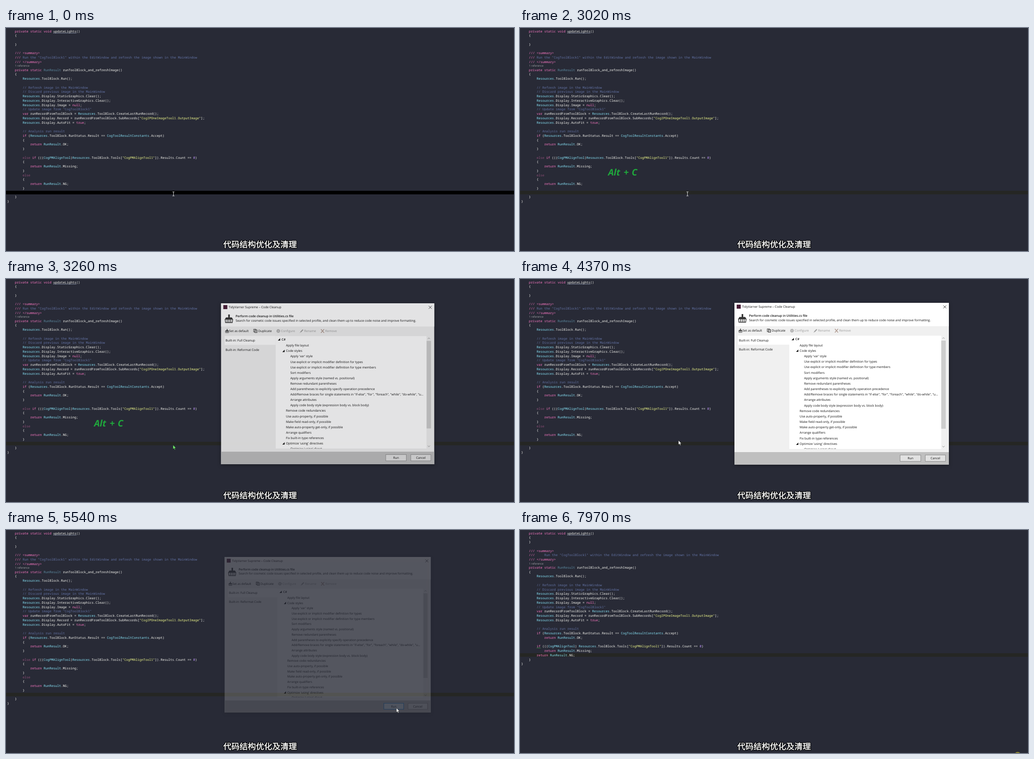
An HTML page with a canvas for the animation above (8.11 s loop, 1130 by 496 pixels).

```html
<!DOCTYPE html>
<html lang="en">
<head>
<meta charset="utf-8">
<title>Code cleanup</title>
<style>
  html, body { margin: 0; width: 100%; height: 100%; overflow: hidden; background: #282a36; }
  canvas { display: block; }
</style>
</head>
<body>
<canvas id="stage" width="1130" height="496"></canvas>
<script>
const stage = document.getElementById('stage').getContext('2d');
const layerCanvas = Object.assign(document.createElement('canvas'), { width: 1130, height: 496 });
const layer = layerCanvas.getContext('2d');
stage.textRendering = layer.textRendering = 'geometricPrecision';
let ctx = stage;

const LOOP = 8110;
const MONO = '"Noto Sans Mono", monospace';
const SANS = '"Open Sans", sans-serif';
const COLUMN = 4.265, ROW = 9.75, LENS = 8;

const colors = {
  keyword: '#ff79c6', comment: '#6272a4', string: '#f1fa8c', type: '#8be9fd',
  dimType: '#5f8fa6', dimKeyword: '#904d78', number: '#bd93f9', plain: '#f8f8f2'
};
const syntax = new RegExp([
  /(?<keyword>\/\/\/( <.*)?|\b(private|static|void|var|if|return|null|true)\b)/,
  /(?<comment>\/\/.*|(?<=\/\/\/).+)/,
  /(?<string>"[^"]*")/,
  /(?<dimType>(?<=static )RunResult)/,
  /(?<dimKeyword>\belse\b)/,
  /(?<type>Resources|RunResult|Cog\w+)/,
  /(?<number>\b0\b)/,
  /(?<plain>\w+|[^\w\s"/]+)/
].map(r => r.source).join('|'), 'g');

const body = `    /// </summary>
    private static RunResult runToolBlock_and_refreshImage()
    {
        Resources.ToolBlock.Run();

        // Refresh image in the MainWindow
        // Discard previous image in the MainWindow
        Resources.Display.StaticGraphics.Clear();
        Resources.Display.InteractiveGraphics.Clear();
        Resources.Display.Image = null;
        // Update image from "CogToolBlock1"
        var runRecordFromToolBlock = Resources.ToolBlock.CreateLastRunRecord();
        Resources.Display.Record = runRecordFromToolBlock.SubRecords["CogIPOneImageTool1.OutputImage"];
        Resources.Display.AutoFit = true;

        // Analysis run result
        if (Resources.ToolBlock.RunStatus.Result == CogToolResultConstants.Accept)`;
const summary = 'Run the "CogToolBlock1" within the EditWindow and refresh the image shown in the MainWindow';

const messyCode = `    private static void updateLights()
    {

    }

    /// <summary>
    /// ${summary}
${body}
        {
            return RunResult.OK;
        }

        else if (((CogPMAlignTool)Resources.ToolBlock.Tools["CogPMAlignTool1"]).Results.Count == 0)
        {
            return RunResult.Missing;
        }
        else
        {
            return RunResult.NG;
        }

    }
}`.split('\n');

const cleanCode = `    private static void updateLights()
    {
    }

    /// <summary>
    ///     ${summary}
${body}
            return RunResult.OK;

        if (((CogPMAlignTool) Resources.ToolBlock.Tools["CogPMAlignTool1"]).Results.Count == 0)
            return RunResult.Missing;
        return RunResult.NG;
    }
}`.split('\n');

// y is the middle of the capital letters
function text(str, x, y, { size = 6.92, family = SANS, weight = 400, color = '#111', align = 'left' } = {}) {
  ctx.font = `${weight} ${size}px ${family}`;
  ctx.fillStyle = color;
  ctx.textAlign = align;
  ctx.fillText(str, x, y + size * 0.355);
}

function rect(x, y, w, h, fill, border) {
  ctx.fillStyle = fill;
  ctx.fillRect(x, y, w, h);
  if (border) {
    ctx.strokeStyle = border;
    ctx.lineWidth = 1;
    ctx.strokeRect(x + 0.5, y + 0.5, w - 1, h - 1);
  }
}

function lines(color, width, ...paths) {
  ctx.strokeStyle = color;
  ctx.lineWidth = width;
  ctx.beginPath();
  for (const [x, y, ...rest] of paths) {
    ctx.moveTo(x, y);
    for (let i = 0; i < rest.length; i += 2) ctx.lineTo(rest[i], rest[i + 1]);
  }
  ctx.stroke();
}

function polygon(points, fill) {
  ctx.fillStyle = fill;
  ctx.beginPath();
  points.forEach(([x, y]) => ctx.lineTo(x, y));
  ctx.closePath();
  ctx.fill();
}

function dashed(x1, x2, y, color) {
  ctx.setLineDash([2, 1]);
  lines(color, 1, [x1, y, x2, y]);
  ctx.setLineDash([]);
}

function drawCode(code) {
  const lensRow = code.findIndex(line => line.includes('_and_'));
  code.forEach((line, row) => {
    const y = 7 + row * ROW + (row >= lensRow ? LENS : 0);
    for (const match of line.matchAll(syntax)) {
      const kind = Object.keys(match.groups).find(k => match.groups[k] !== undefined);
      text(match[0], 2.8 + match.index * COLUMN, y, { size: 7.11, family: MONO, weight: 500, color: colors[kind] });
    }
  });
  text('1 reference', 20, lensRow * ROW + 6.2, { size: 6.1, color: '#a3a4a8' });
  dashed(105.5, 157, 11.5, '#a9b4cc');
}

function broom(x, y, s) {
  ctx.save();
  ctx.translate(x, y);
  ctx.scale(s, s);
  rect(8, 0, 3.5, 7, '#333');
  polygon([[3, 6.5], [16, 6.5], [19, 11.5], [0, 11.5]], '#333');
  lines('#333', 1.5, [1, 11, 2, 18.3, 17, 18.3, 18, 11], [5.5, 11, 5.5, 18], [9.5, 11, 9.5, 18], [13.5, 11, 13.5, 18]);
  ctx.restore();
}

function drawToolbar() {
  const gray = { color: '#9b9b9b' };
  broom(486, 110.5, 0.46);
  text('Set as default', 495, 115);
  rect(549.5, 110.5, 6, 7, '#eee', '#333');
  rect(552, 112, 6, 7, '#eee', '#333');
  lines('#333', 0.7, [553.5, 114.5, 556.5, 114.5], [553.5, 116.5, 556.5, 116.5]);
  text('Duplicate', 560, 115);
  ctx.strokeStyle = '#a0a0a0';
  for (const [radius, width, dash] of [[3.6, 1.3, [1.6, 1.2]], [2.4, 1.2, []], [0.7, 0.8, []]]) {
    ctx.lineWidth = width;
    ctx.setLineDash(dash);
    ctx.beginPath();
    ctx.arc(605, 115, radius, 0, 7);
    ctx.stroke();
  }
  ctx.setLineDash([]);
  text('Configure', 611, 115, gray);
  lines('#a0a0a0', 2.4, [655, 117.3, 660.3, 112]);
  lines('#a0a0a0', 1, [653.2, 119, 655, 117.3]);
  text('Rename', 663, 115, gray);
  lines('#b09a90', 1.6, [700.5, 111, 707.5, 119], [707.5, 111, 700.5, 119]);
  text('Remove', 710, 115, gray);
}

const tree = [
  [1, 'Apply file layout'], [1, 'Code styles', true], [2, "Apply 'var' style"],
  [2, 'Use explicit or implicit modifier definition for types'],
  [2, 'Use explicit or implicit modifier definition for type members'],
  [2, 'Sort modifiers'], [2, 'Apply arguments style (named vs. positional)'],
  [2, 'Remove redundant parentheses'],
  [2, 'Add parentheses to explicitly specify operation precedence'],
  [2, 'Add/Remove braces for single statements in "if-else", "for", "foreach", "while", "do-while", "u...'],
  [2, 'Arrange attributes'], [2, 'Apply code body style (expression body vs. block body)'],
  [1, 'Remove code redundancies'], [1, 'Use auto-property, if possible'],
  [1, 'Make field read-only, if possible'], [1, 'Make auto-property get-only, if possible'],
  [1, 'Arrange qualifiers'], [1, 'Fix built-in type references'],
  [1, "Optimize 'using' directives", true], [2, "Optimize 'using' direct"]
];

function expander(x, y) {
  polygon([[x, y + 2.6], [x + 5.2, y + 2.6], [x + 5.2, y - 2.6]], '#111');
}

function drawTree() {
  ctx.save();
  ctx.beginPath();
  ctx.rect(599, 126, 348, 252);
  ctx.clip();
  rect(599, 126, 338, 252, '#fff');
  rect(937, 126, 10, 252, '#f0f0f0');
  rect(937, 137, 10, 196, '#cdcdcd');
  lines('#777', 0.8, [939.5, 132.8, 942, 130.3, 944.5, 132.8], [939.5, 371.5, 942, 374, 944.5, 371.5]);
  expander(604, 133.7);
  text('C#', 612.5, 133.7, { weight: 600 });
  tree.forEach(([depth, label, open], i) => {
    const y = 147.3 + i * 12.17;
    if (open) expander(614, y);
    text(label, 612.3 + depth * 9.8, y);
  });
  ctx.restore();
}

// buttonState: 0 idle, 1 hover, 2 pressed
function drawWindow(buttonState) {
  rect(477, 53, 477, 360, '#f0f0f0');
  rect(477, 53, 477, 52, '#fff');
  rect(482, 57, 9, 9, '#4a1f38');
  text('TidyVarner Supreme – Code Cleanup', 494, 62);
  lines('#222', 0.9, [941.7, 58.7, 948.3, 65.3], [948.3, 58.7, 941.7, 65.3]);
  broom(485, 78, 1);
  text('Perform code cleanup in Utilities.cs file', 509.5, 81.7, { weight: 600 });
  text('Search for cosmetic code issues specified in selected profile, and clean them up to reduce code noise and improve formatting.', 509.5, 91.3);
  drawToolbar();
  rect(485, 126, 114, 20, '#fff');
  text('Built-in: Full Cleanup', 487, 136.3);
  text('Built-in: Reformat Code', 487, 157);
  drawTree();
  rect(477, 385, 477, 28, '#bfbfbf');
  const [fill, border] = [['#e1e1e1', '#8c8c8c'], ['#e5f1fb', '#0078d7'], ['#cce4f7', '#005499']][buttonState];
  rect(845, 391, 47, 15, fill, border);
  rect(901, 391, 46, 15, '#e1e1e1', '#8c8c8c');
  text('Run', 868.5, 398.7, { align: 'center' });
  text('Cancel', 924, 398.7, { align: 'center' });
}

// shown runs from 0 (closed) to 1 (open); the window fades and grows as one layer
function drawDialog(shown, buttonState) {
  const scale = 0.95 + 0.05 * shown;
  ctx = layer;
  ctx.clearRect(0, 0, 1130, 496);
  ctx.save();
  ctx.translate(715.5, 233);
  ctx.scale(scale, scale);
  ctx.translate(-715.5, -233);
  drawWindow(buttonState);
  ctx.restore();
  ctx = stage;
  ctx.save();
  ctx.globalAlpha = shown;
  ctx.shadowColor = 'rgba(0, 0, 0, 0.35)';
  ctx.shadowBlur = 8;
  ctx.shadowOffsetY = 2;
  ctx.drawImage(layerCanvas, 0, 0);
  ctx.restore();
}

function drawArrow(x, y, fill) {
  const shape = [[0, 0], [0, 9.6], [2.2, 7.6], [3.7, 10.9], [5.2, 10.2], [3.7, 7], [6.6, 7]];
  const points = shape.map(([dx, dy]) => [x + dx, y + dy]);
  polygon(points, fill);
  lines('#111', 0.5, [...points, points[0]].flat());
}

function drawBeam(x, y) {
  lines('#d8d8d8', 1, [x, y - 4.5, x, y + 4.5],
    [x - 2.2, y - 4.5, x + 2.2, y - 4.5], [x - 2.2, y + 4.5, x + 2.2, y + 4.5]);
}

// keys: [time, x, y]
function along(keys, t) {
  const i = keys.findIndex(key => t < key[0]);
  if (i === 0) return keys[0].slice(1);
  if (i < 0) return keys.at(-1).slice(1);
  const [t0, x0, y0] = keys[i - 1], [t1, x1, y1] = keys[i];
  const p = (t - t0) / (t1 - t0), e = p * p * (3 - 2 * p);
  return [x0 + (x1 - x0) * e, y0 + (y1 - y0) * e];
}

// value of the last step already reached
const stepAt = (steps, t) => steps.reduce((value, [time, next]) => t >= time ? next : value, 0);

const dialogSteps = [[3100, 0.25], [3190, 0.62], [3260, 0.88], [3370, 1], [5440, 0.65], [5540, 0.22], [5610, 0]];
const buttonSteps = [[5210, 1], [5290, 2], [5440, 1]];
const caretSteps = [[150, 1], [700, 0], [1230, 1], [1780, 0], [2330, 1], [2790, 0], [6080, 1], [6540, 0], [7070, 1], [7970, 0]];
const arrowPath = [[4370, 352.5, 359], [4870, 979, 437], [5140, 868.5, 396]];
const beamPath = [[6770, 870, 396], [7240, 1038, 506]];

function drawPointer(t) {
  if (t < 3190) drawBeam(372.5, 369);
  else if (t < 4370) drawArrow(371.5, 369, t < 3370 ? '#6fe86a' : '#fff');
  else if (t < 6080) drawArrow(...along(arrowPath, t), '#fff');
  else drawBeam(...along(beamPath, t));
}

function drawSubtitle() {
  const label = '代码结构优化及清理';
  ctx.font = '18.2px "Noto Sans CJK SC", "Noto Sans CJK", sans-serif';
  ctx.textAlign = 'center';
  ctx.lineJoin = 'round';
  for (const [color, width] of [['#000', 3], ['#fff', 0.5]]) {
    ctx.strokeStyle = color;
    ctx.lineWidth = width;
    ctx.strokeText(label, 565, 487.6);
  }
  ctx.fillStyle = '#fff';
  ctx.fillText(label, 565, 487.6);
  ctx.lineJoin = 'miter';
}

function draw(t) {
  const clean = t >= 6080;
  const focused = t < 3020 || (clean && t < 7970);
  rect(0, 0, 1130, 496, '#282a36');
  rect(0, clean ? 274 : 362, 1130, 8, focused ? '#000' : '#252624');
  drawCode(clean ? cleanCode : messyCode);
  if (t >= 6380) dashed(37.5, 46, 262.5, '#3fae4a');
  if (stepAt(caretSteps, t)) rect(clean ? 122 : 33, clean ? 273 : 361, 1, 9, '#e8e8e8');

  if (t >= 3020 && t < 3370) {
    const style = { size: 20, family: '"Noto Sans", sans-serif', weight: 'italic 600', color: '#1fa83c' };
    text('Alt', 196, 321, style);
    text('+', 230.5, 321, style);
    text('C', 248.5, 321, style);
  }
  const shown = stepAt(dialogSteps, t);
  if (shown) drawDialog(shown, stepAt(buttonSteps, t));
  drawSubtitle();
  drawPointer(t);
  if (t >= 7970) {
    ctx.fillStyle = '#8a8430';
    ctx.beginPath();
    ctx.arc(1107, 501, 7.5, 0, 7);
    ctx.fill();
  }
}

const start = performance.now();
function tick() {
  draw((performance.now() - start) % LOOP);
  requestAnimationFrame(tick);
}
tick();
</script>
</body>
</html>
```
